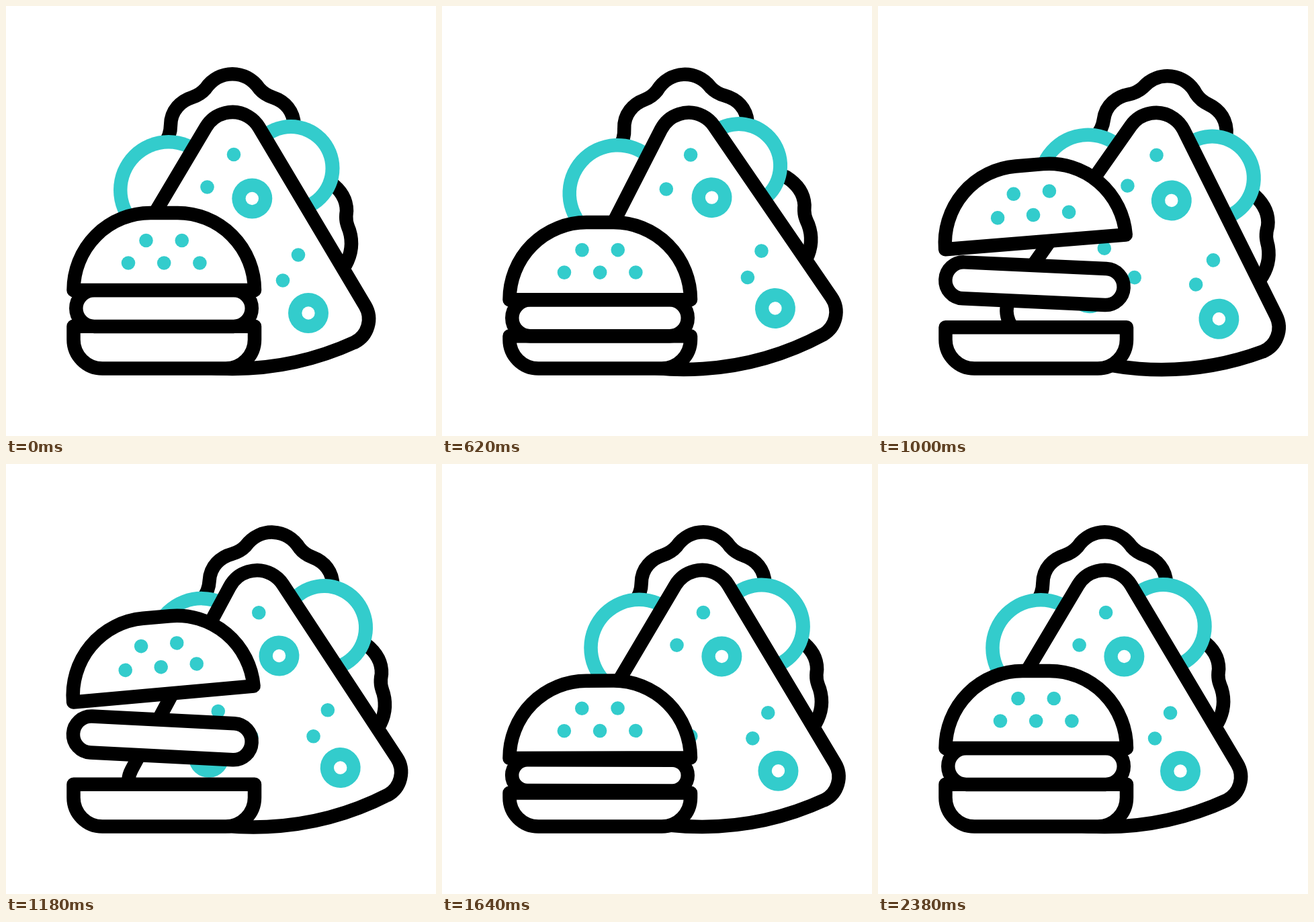
Animation, 640 px wide and 640 px high, one loop 2400 ms. Source, as an HTML page with a canvas:

```html
<!DOCTYPE html>
<html lang="en">
<head>
<meta charset="utf-8">
<title>Burger and sandwich</title>
<style>
  html, body { margin: 0; width: 100%; height: 100%; overflow: hidden; background: #fff; }
  canvas { display: block; width: 100vw; height: 100vh; }
</style>
</head>
<body>
<canvas id="stage" width="640" height="640"></canvas>
<script>
const ctx = document.getElementById('stage').getContext('2d');
const LOOP = 2400;
const BLACK = '#000', WHITE = '#fff', TEAL = '#33cccc';
const LINE = 20.5;
const PIVOT = { x: 337, y: 540 };
const TRAVEL = 51.5;

// Eased rise from 0 to 1 between two times.
function ramp(t, from, to) {
  const u = Math.min(1, Math.max(0, (t - from) / (to - from)));
  return (1 - Math.cos(Math.PI * u)) / 2;
}

// Rises to 1 and falls back to 0; holds at 1 between riseEnd and fallStart.
const swell = (t, riseStart, riseEnd, fallStart, fallEnd) =>
  ramp(t, riseStart, riseEnd) - ramp(t, fallStart, fallEnd);

// Sum of smooth beats, 400 ms to either side: three on the way out, one on the way back.
const BEATS = [500, 900, 1300, 2000];
const rock = (t, gains) =>
  gains.reduce((sum, gain, i) => sum + gain * swell(t, BEATS[i] - 400, BEATS[i], BEATS[i], BEATS[i] + 400), 0);

// tilt in degrees, trail in pixels behind the common travel
const slice = { tilt: [-6.2, 5.9, -4.7, 4.5], trail: [] };
const lettuce = { tilt: [-6, 8.2, 1, 8.2], trail: [-6.5, -5.5, -10.5, -2] };
const tomato = { tilt: [-6, 9.3, -0.7, 11.8], trail: [-19, -20, -6, -12.5] };

const lettucePath = new Path2D(
  'M236 205 Q245 192 245 178 C245 155 261 141 277 136 C286 133 291 130 297 123' +
  'C317 94 357 94 377 123 C383 130 388 133 397 136 C415 142 428 156 429 178 L428 200' +
  'M462 252 L482 262 C496 272 507 286 507 305 C505 318 507 324 511 334 C516 350 515 368 505 386');

const bunPath = new Path2D('M100.5 423 A114.5 115 0 0 1 215 308 H255.5 A114.5 115 0 0 1 370 423 Z');

// Slice outline, relative to the pivot and symmetric about it.
const slicePath = new Path2D();
{
  const lean = 0.536, cornerX = 219, cornerY = -58, baseAngle = 1.14;
  slicePath.arc(0, -336, 46, Math.PI + lean, -lean);
  slicePath.arcTo(cornerX, cornerY, 183, -40, 39);
  slicePath.arc(0, -438, 438, baseAngle, Math.PI - baseAngle);
  slicePath.arcTo(-cornerX, cornerY, -39.5, -359.5, 39);
  slicePath.closePath();
}

function outline(path) {
  ctx.fillStyle = WHITE;
  ctx.fill(path);
  ctx.stroke(path);
}

function box(x, y, width, height, radii) {
  const path = new Path2D();
  path.roundRect(x, y, width, height, radii);
  outline(path);
}

function disc(x, y, r, color = TEAL) {
  ctx.fillStyle = color;
  ctx.beginPath();
  ctx.arc(x, y, r, 0, 2 * Math.PI);
  ctx.fill();
}

function ring(x, y, outer, inner) {
  disc(x, y, outer);
  disc(x, y, inner, WHITE);
}

const dot = (x, y) => disc(x, y, 10.3);

// Draws in rest coordinates, turned about (px, py) and then moved.
function posed(px, py, dx, dy, degrees, draw) {
  ctx.save();
  ctx.translate(px + dx, py + dy);
  ctx.rotate(degrees * Math.PI / 180);
  ctx.translate(-px, -py);
  draw();
  ctx.restore();
}

function rocking(t, { tilt, trail }, draw) {
  const shift = TRAVEL * swell(t, 100, 600, 1600, 2100) + rock(t, trail);
  posed(PIVOT.x, PIVOT.y, shift, 0, rock(t, tilt), draw);
}

function drawTomatoes() {
  ring(242, 274, 82, 61.5);
  ring(424, 241.5, 72.5, 51.5);
}

function drawSlice() {
  ctx.save();
  ctx.translate(PIVOT.x, PIVOT.y);
  outline(slicePath);
  ctx.restore();
  for (const [x, y] of [[339, 221], [299.5, 269.5], [435, 370.5], [412, 408.5], [272, 365], [320, 405]]) dot(x, y);
  for (const [x, y] of [[366.3, 286.5], [450, 457], [255, 433]]) ring(x, y, 30, 9.7);
}

// Three crumbs fan out from behind the bun as it lands.
function drawCrumbs(t) {
  if (t < 1700) return;
  const reach = 0.55 + 0.45 * swell(t, 1700, 2040, 2040, 2400);
  for (let i = 0; i < 3; i++) {
    const angle = (214.2 + 18.2 * i) * Math.PI / 180;
    const radius = (168 + 10 * (i % 2)) * reach;
    dot(215 + radius * Math.cos(angle), 423 + radius * Math.sin(angle));
  }
}

function drawBun() {
  outline(bunPath);
  for (let i = 0; i < 2; i++) dot(208.5 + 53.3 * i, 349);
  for (let i = 0; i < 3; i++) dot(182 + 53.2 * i, 382.5);
}

function drawBurger(t) {
  const crouch = swell(t, 100, 600, 600, 1100);
  const lift = swell(t, 600, 1100, 1200, 1700);
  const land = swell(t, 1200, 1700, 1700, 2000);

  const baseTop = 476.8 + 14.5 * crouch + 13.2 * land;
  box(100.5, baseTop, 269.5, 539.6 - baseTop, [0, 0, 43, 43]);

  const stretch = 4.5 * lift, height = 54 - 8.5 * land;
  posed(235, 450, 0, 14.5 * crouch - 42 * lift + 15.3 * land, 2.9 * lift, () =>
    box(104.3 - stretch, 450 - height / 2, 261.5 + stretch, height, height / 2));

  posed(235, 433, 0, 14.5 * crouch - 80.5 * lift + 18 * land, -5.1 * lift, drawBun);
}

function draw(t) {
  ctx.fillStyle = WHITE;
  ctx.fillRect(0, 0, 640, 640);
  ctx.strokeStyle = BLACK;
  ctx.lineWidth = LINE;
  ctx.lineJoin = 'round';
  rocking(t, lettuce, () => ctx.stroke(lettucePath));
  rocking(t, tomato, drawTomatoes);
  rocking(t, slice, drawSlice);
  drawCrumbs(t);
  drawBurger(t);
}

const start = performance.now();
function tick() {
  draw((performance.now() - start) % LOOP);
  requestAnimationFrame(tick);
}
tick();
</script>
</body>
</html>
```
